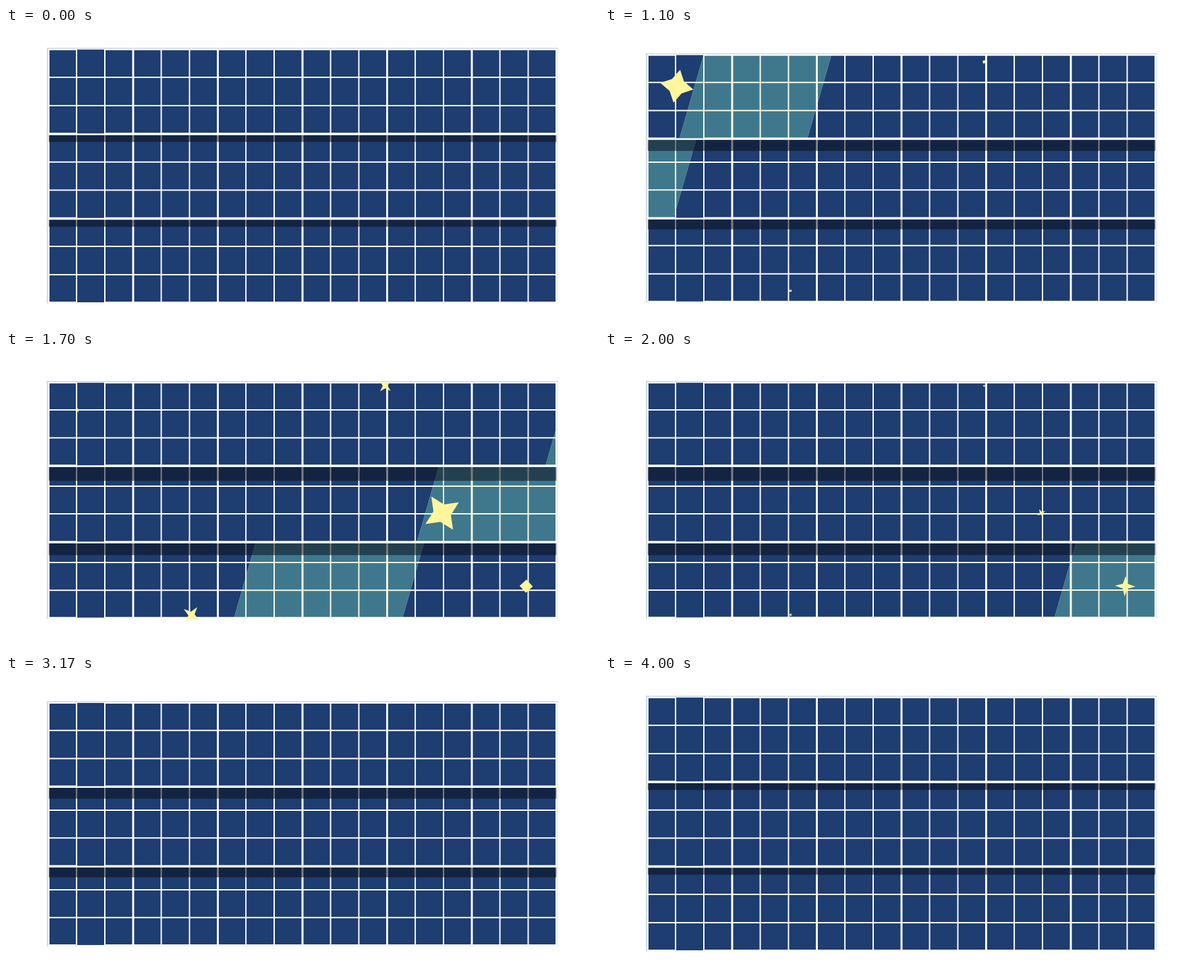
An HTML page with a canvas that plays this animation: 900 by 450 pixels, repeating every 4030 ms.

```html
<!DOCTYPE html>
<html lang="en">
<head>
<meta charset="utf-8">
<title>Solar panels</title>
<style>
  html, body { margin: 0; width: 100%; height: 100%; overflow: hidden; background: #fff; }
  canvas { display: block; }
</style>
</head>
<body>
<canvas id="stage" width="900" height="450"></canvas>
<script>
const ctx = document.getElementById('stage').getContext('2d');
const LOOP = 4030;
const LEFT = 64.5, GROUP = 128.5, GROUPS = 6, RIGHT = LEFT + GROUP * GROUPS;
const SLANT = 0.288;
const NAVY = '#1e3d70', TEAL = '#3f788d', CREAM = '#fcfae0', YELLOW = '#fff59d';
const SHADOW = 'rgba(10, 15, 26, 0.52)';

// Horizontal edges and dividers of each row, spread out and pulled together.
// The glare's bottom corners move as x + speed * d + bend * d * d, d from 1430 ms.
const rows = [
  { apart: [33.8, 75, 118, 159.3], close: [47.8, 88, 130.5, 171.3],
    glare: { left: 521, leftSpeed: 1.163, right: 793, rightSpeed: 1.4, bend: -0.00023 } },
  { apart: [163, 203.8, 246.5, 287.8], close: [163, 204, 246, 287.3],
    glare: { left: 299, leftSpeed: 1.2, right: 537, rightSpeed: 1.315, bend: 0 } },
  { apart: [291.3, 332, 375, 416], close: [280, 320, 362, 402.6],
    glare: { left: 43, leftSpeed: 1.12, right: 239, rightSpeed: 1.34, bend: 0 } }
];

// Each star swells to its peak and fades; angle and spin are in degrees.
const stars = [
  { x: 109, y: 88.5, peak: 1165, size: 33, tau: 250, angle: 9, spin: -9 },
  { x: 575.5, y: 51.5, peak: 1533, size: 27, tau: 195, angle: 63, spin: -23 },
  { x: 281.5, y: 399.5, peak: 1582, size: 27, tau: 195, angle: 38, spin: -2 },
  { x: 662, y: 245, peak: 1706, size: 31, tau: 195, angle: 57, spin: 3.5 },
  { x: 789.5, y: 356, peak: 1894, size: 27, tau: 195, angle: 3, spin: 0 }
];

const clamp = (v, lo, hi) => Math.min(hi, Math.max(lo, v));
const mix = (a, b, k) => a + (b - a) * k;
const easeOut = p => 1 - (1 - clamp(p, 0, 1)) ** 3;

function pull(t, start) {
  return t < 3010 ? easeOut((t - start) / 800) : 1 - easeOut((t - 3010) / 1000);
}

function fillRect(color, x0, y0, x1, y1) {
  ctx.fillStyle = color;
  ctx.fillRect(x0, y0, x1 - x0, y1 - y0);
}

function cellPath(edges) {
  const path = new Path2D();
  for (let g = 0; g < GROUPS; g++) {
    const x = LEFT + g * GROUP;
    const xs = [x + 1.5, x + 42.6, x + 85.5, x + 127];
    for (let c = 0; c < 3; c++) {
      const extra = g === 0 && c === 1 ? 1 : 0;
      const x0 = xs[c] + (c ? 1 : 0), x1 = xs[c + 1] - (c < 2 ? 1 : 0);
      for (let r = 0; r < 3; r++) {
        const y0 = edges[r] + (r ? 1 : -extra);
        const y1 = edges[r + 1] + (r < 2 ? -1 : extra);
        path.rect(x0, y0, x1 - x0, y1 - y0);
      }
    }
  }
  return path;
}

function drawRow(edges, glare, t) {
  const top = edges[0], bottom = edges[3];
  const cells = cellPath(edges);
  fillRect('#fff', LEFT, top - 2, RIGHT, bottom + 3.6);
  ctx.fillStyle = NAVY;
  ctx.fill(cells);

  const d = t - 1430, bend = glare.bend * d * d;
  const x0 = glare.left + glare.leftSpeed * d + bend;
  const x1 = glare.right + glare.rightSpeed * d + bend;
  const lean = (bottom - top) * SLANT;
  if (t < 800 || t > 2400 || x1 + lean < LEFT || x0 > RIGHT) return;
  ctx.save();
  ctx.beginPath();
  ctx.moveTo(x0 - SLANT, bottom + 1);
  ctx.lineTo(x0 + lean, top);
  ctx.lineTo(x1 + lean, top);
  ctx.lineTo(x1 - SLANT, bottom + 1);
  ctx.clip();
  fillRect(CREAM, LEFT + 1.5, top, RIGHT - 1.5, bottom + 1);
  ctx.fillStyle = TEAL;
  ctx.fill(cells);
  ctx.restore();
}

function drawStar(star, t) {
  const u = (t - star.peak) / star.tau;
  if (Math.abs(u) > 3) return;
  const outer = star.size * Math.exp(-Math.abs(u));
  const inner = outer * clamp(0.44 - 0.28 * u, 0.33, 0.707);
  const turn = (star.angle + star.spin * u) * Math.PI / 180;
  ctx.beginPath();
  for (let i = 0; i < 8; i++) {
    const radius = i % 2 ? inner : outer;
    const a = turn + i * Math.PI / 4;
    ctx.lineTo(star.x + radius * Math.cos(a), star.y + radius * Math.sin(a));
  }
  ctx.fillStyle = YELLOW;
  ctx.fill();
}

function drawFrame(top, bottom) {
  fillRect('#e6eff5', 63, top, 65, bottom);
  fillRect('#b4c4d4', 62.3, top, 63.2, bottom);
  fillRect('#d3dde6', 836.8, top, 837.6, bottom);
  fillRect('#b4c4d4', 62.3, top, 837.6, top + 1);
}

function draw(t) {
  const upper = pull(t, 890), lower = pull(t, 1075);
  const edges = rows.map((row, i) =>
    row.apart.map((y, j) => mix(y, row.close[j], i === 2 ? lower : upper)));

  fillRect('#fff', 0, 0, 900, 450);
  // Lower rows slide beneath the ones above them.
  for (let i = 2; i >= 0; i--) {
    drawRow(edges[i], rows[i].glare, t);
    if (i > 0) {
      const y = edges[i - 1][3] + 3.5;
      const depth = i === 1 ? mix(10.5, 21, upper) : mix(10.8, 18, upper);
      fillRect(SHADOW, LEFT, y, RIGHT, y + depth);
    }
  }
  drawFrame(edges[0][0] - 3.4, edges[2][3] + 2.8);
  stars.forEach(star => drawStar(star, t));
}

const start = performance.now();
function tick() {
  draw((performance.now() - start) % LOOP);
  requestAnimationFrame(tick);
}
tick();
</script>
</body>
</html>
```
